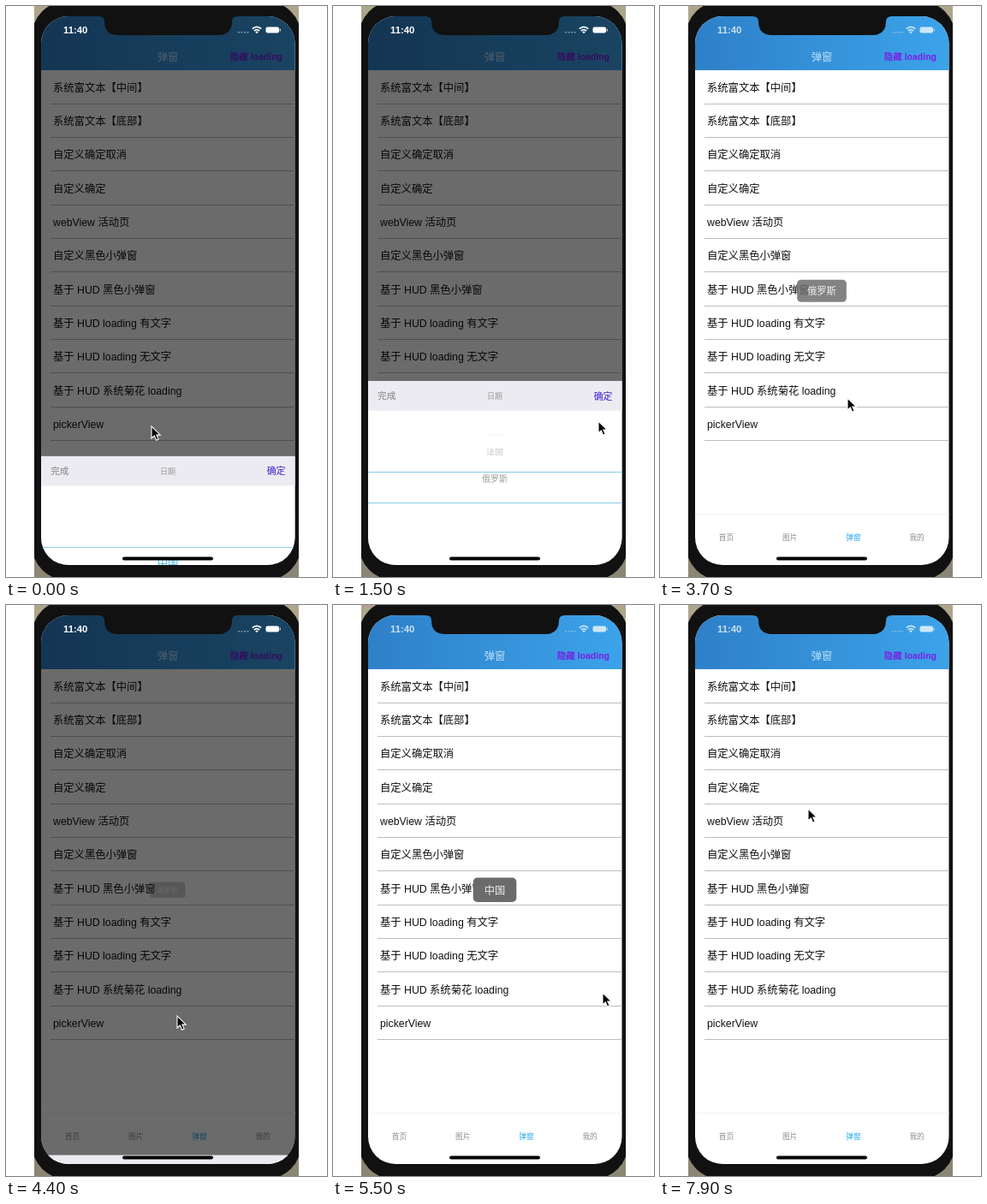
An HTML page for the animation above (8 s loop, 375x667 px).

```html
<!DOCTYPE html>
<html lang="zh-CN">
<head>
<meta charset="utf-8">
<style>
html, body { margin: 0; width: 100%; height: 100%; overflow: hidden; background: #fff; }
svg { display: block; width: 375px; height: 667px; }
text { font-family: "Liberation Sans", "Noto Sans CJK SC", "Noto Sans CJK", sans-serif; white-space: pre; }
</style>
</head>
<body>
<svg viewBox="0 0 375 667">
  <defs>
    <linearGradient id="sky"><stop stop-color="#2e80c8"/><stop offset="1" stop-color="#3ca3ea"/></linearGradient>
    <linearGradient id="desk" x2="0" y2="1"><stop stop-color="#aea58c"/><stop offset="1" stop-color="#8b8674"/></linearGradient>
    <clipPath id="screen"><rect x="41" y="12" width="296.5" height="641" rx="32"/></clipPath>
    <clipPath id="strip"><rect x="33" width="309" height="667"/></clipPath>
  </defs>
  <g clip-path="url(#strip)">
    <rect x="33" width="309" height="667" fill="url(#desk)"/>
    <rect x="30" y="-6" width="315" height="677" rx="42" fill="#111"/>
  </g>
  <g clip-path="url(#screen)">
    <rect x="41" y="12" width="297" height="641" fill="#fff"/>
    <rect x="41" y="12" width="297" height="63" fill="url(#sky)"/>
    <g id="page"></g>
    <g id="toast">
      <rect id="toastBox" y="318.5" height="28.5" rx="5" fill="#6b6b6b"/>
    </g>
    <rect id="dim" x="41" y="12" width="297" height="641" opacity=".58"/>
    <g id="sheet">
      <rect x="41" width="297" height="230" fill="#fff"/>
      <rect x="41" width="297" height="34.5" fill="#ecebf1"/>
      <g id="wheel"></g>
      <path d="M41 106.5H338M41 142.5H338" stroke="#86cce8"/>
    </g>
  </g>
  <path d="M108 11V12Q115 12 115 18Q115 34 131 34H248Q264 34 264 18Q264 12 271 12V11Z" fill="#111"/>
  <g id="status" fill="#fff">
    <path d="M271 30h2v1.5h-2zM274.500 30h2v1.500h-2zM278 30h2v1.500h-2zM281.500 30h2v1.500h-2z" opacity=".45"/>
    <g fill="none" stroke="#fff" stroke-width="1.7"><path d="M287.800 26.700Q293 22 298.200 26.700M289.900 29Q293 26.200 296.100 29"/></g>
    <path d="M291.200 30.300Q293 28.800 294.800 30.300L293 32.300Z"/>
    <rect x="303.500" y="24.500" width="15.500" height="7" rx="2"/><rect x="319.700" y="26.500" width="1" height="3" rx=".5"/>
  </g>
  <rect x="136" y="643.500" width="106" height="4" rx="2"/>
  <path id="cursor" d="M0 0V14L3.300 11L5.600 16.200L8.100 15.100L5.800 10.100H10.200Z" stroke="#fff" stroke-width="1.100"/>
</svg>
<script>
const $ = id => document.getElementById(id);
const NS = 'http://www.w3.org/2000/svg';
const LOOP = 8000;

function add(parent, name, attrs, content = '') {
  const el = parent.appendChild(document.createElementNS(NS, name));
  for (const key in attrs) el.setAttribute(key, attrs[key]);
  el.textContent = content;
  return el;
}

// y is the vertical centre of the line
function label(parent, content, x, y, size, fill, anchor = 'start', weight = 400) {
  return add(parent, 'text', {
    x, y: y + size * .37, 'font-size': size, fill, 'text-anchor': anchor, 'font-weight': weight
  }, content);
}

const page = $('page'), sheet = $('sheet');
label(page, '弹窗', 189, 59, 12.3, '#c0e0f6', 'middle');
label(page, '隐藏 loading', 323, 59, 10.5, '#7a20e4', 'end', 700);
['系统富文本【中间】', '系统富文本【底部】', '自定义确定取消', '自定义确定', 'webView 活动页',
  '自定义黑色小弹窗', '基于 HUD 黑色小弹窗', '基于 HUD loading 有文字', '基于 HUD loading 无文字',
  '基于 HUD 系统菊花 loading', 'pickerView'].forEach((row, i) => {
  label(page, row, 55, 95 + i * 39.35, 12.3, '#111');
  add(page, 'rect', { x: 52, y: Math.round(113.5 + i * 39.35), width: 286, height: 1, fill: '#bdbdbd' });
});
add(page, 'rect', { x: 41, y: 593, width: 297, height: 1, fill: '#f3f3f3' });
['首页', '图片', '弹窗', '我的'].forEach((tab, i) =>
  label(page, tab, 77.5 + i * 74.2, 621, 8.7, i === 2 ? '#27a6ea' : '#8c8c8c', 'middle'));

label(sheet, '完成', 52, 17.5, 10.7, '#858585');
label(sheet, '日期', 189, 17.5, 9, '#999', 'middle');
label(sheet, '确定', 326.5, 17.5, 10.9, '#3a22d2', 'end', 500);
label($('status'), '11:40', 67, 28, 11.3, '#fff', 'start', 700);

const toastText = label($('toast'), '', 189, 333, 12.3, '#ececec', 'middle');
const items = ['中国', '美国', '英国', '法国', '俄罗斯'].map(name =>
  label($('wheel'), name, 0, 0, 10, '#999', 'middle'));

const clamp = v => Math.min(1, Math.max(0, v));
const smooth = v => (1 - Math.cos(Math.PI * clamp(v))) / 2;

// keys: [time, value, ...]
function at(keys, t) {
  let i = keys.findIndex(k => k[0] > t);
  if (i < 0) return keys[keys.length - 1].slice(1);
  if (i === 0) return keys[0].slice(1);
  const a = keys[i - 1], b = keys[i], p = smooth((t - a[0]) / (b[0] - a[0]));
  return a.slice(1).map((v, n) => v + (b[n + 1] - v) * p);
}

const pointer = [[0, 170, 491], [400, 196, 588], [550, 196, 588], [850, 200, 515], [1000, 205, 512],
  [1500, 310, 485], [2200, 312, 459], [3200, 312, 459], [3700, 219, 458], [4200, 200, 480],
  [4400, 200, 480], [4850, 315, 453], [5700, 315, 453], [7400, 173, 238]];
const spin = [[550, 0], [900, 2.6], [1300, 4.25], [1500, 4.29], [1900, 4]];
const visits = [{ open: -158, close: 3100 }, { open: 4342, close: 4900 }];
const toasts = [{ name: '俄罗斯', show: 3450, hide: 4190 }, { name: '中国', show: 5200, hide: 6200 }];

function drawWheel(t) {
  const scroll = t < 4000 ? at(spin, t)[0] : 0;
  const resting = t <= 550 || t >= 1900;
  items.forEach((el, i) => {
    const angle = (i - scroll) * .529, squash = Math.cos(angle);
    const chosen = resting && Math.abs(angle) < .01;
    const visible = Math.abs(angle) < 1.5;
    el.setAttribute('visibility', visible ? 'inherit' : 'hidden');
    el.setAttribute('transform', `translate(189 ${124.5 + 65.5 * Math.sin(angle)}) scale(1 ${Math.max(.01, squash)})`);
    el.setAttribute('y', chosen ? 4.5 : 3.7);
    el.setAttribute('font-size', chosen ? 12.3 : 10);
    el.setAttribute('fill', chosen ? '#42b4e4' : '#999');
    el.setAttribute('opacity', visible ? squash * squash : 0);
  });
}

function drawToast(t) {
  const now = toasts.find(k => t > k.show && t < k.hide + 300);
  $('toast').setAttribute('visibility', now ? 'visible' : 'hidden');
  if (!now) return;
  const level = Math.min(clamp((t - now.show) / 300), 1 - clamp((t - now.hide) / 300));
  const width = now.name.length * 12.3 + 26;
  toastText.textContent = now.name;
  $('toastBox').setAttribute('x', 189 - width / 2);
  $('toastBox').setAttribute('width', width);
  $('toast').setAttribute('opacity', level);
  $('toast').setAttribute('transform', `translate(189 333) scale(${.5 + level / 2}) translate(-189 -333)`);
}

function draw(t) {
  const visit = visits.find(v => t >= v.open && t < v.close + 250);
  const rise = visit ? smooth((t - visit.open) / 275) - smooth((t - visit.close) / 250) : 0;
  sheet.setAttribute('transform', `translate(0 ${667 - 229 * rise})`);
  $('dim').setAttribute('visibility', visit ? 'visible' : 'hidden');
  $('status').setAttribute('opacity', visit ? 1 : .75);
  drawWheel(t);
  drawToast(t);
  $('cursor').setAttribute('transform', `translate(${at(pointer, t)})`);
}

const start = performance.now();
function tick() {
  draw(Math.floor((performance.now() - start) % LOOP / 100) * 100);
  requestAnimationFrame(tick);
}
tick();
</script>
</body>
</html>
```
